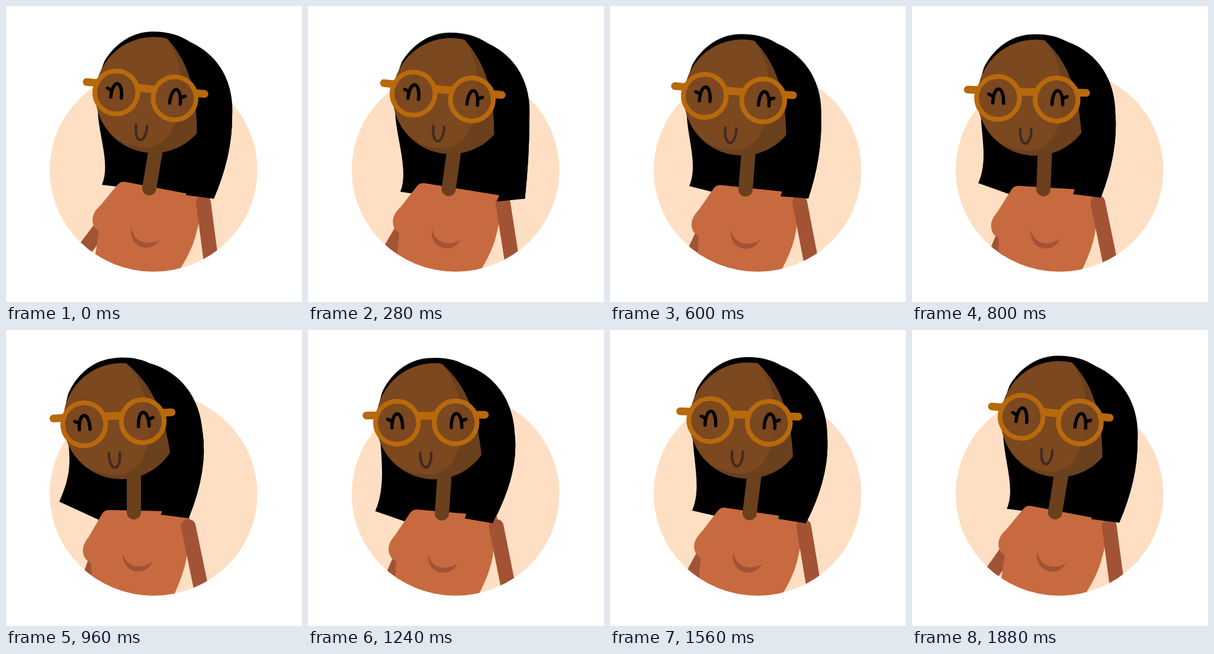
An HTML page for the animation above (1.92 s loop, 500 by 500 pixels).

```html
<!DOCTYPE html>
<html lang="en">
<head>
<meta charset="utf-8">
<title>Swaying portrait</title>
<style>
  html, body { margin: 0; width: 100%; height: 100%; overflow: hidden; background: #fff; }
  svg { display: block; width: 100%; height: 100%; }
  .line { fill: none; stroke-linecap: round; }
</style>
</head>
<body>
<svg viewBox="0 0 500 500">
  <clipPath id="disc"><ellipse cx="249.2" cy="277" rx="175.4" ry="171.7"/></clipPath>
  <ellipse cx="249.2" cy="277" rx="175.4" ry="171.7" fill="#fedfc3"/>
  <g clip-path="url(#disc)">
    <path id="leftArm" fill="none" stroke="#a25335" stroke-width="25"/>
  </g>
  <path id="hair"/>
  <g clip-path="url(#disc)">
    <!-- torso, origin at the base of the neck -->
    <g id="torso">
      <path fill="#c86a3f" d="M-42-4L94-1Q94 32 90 70C87 92 80 112 69 137L49 190H-70L-72 89Q-72 84-78 82C-86 76-88 64-84 54Q-82 49-76 41L-54 3Q-50-4-42-4Z"/>
      <path fill="#a25335" d="M-19 68C-20 87-9 100 8 100C19 100 28 92 32 82C24 89 14 92 4 91C-9 89-17 79-19 68Z"/>
    </g>
    <path id="rightArm" class="line" stroke="#a25335" stroke-width="25"/>
  </g>
  <path id="neck" class="line" stroke="#6b401d" stroke-width="24" d="M0 0V-72"/>
  <path id="strand"/>
  <!-- head, origin at the middle of the glasses -->
  <g id="head">
    <path fill="#6b401d" d="M93 55A98 98 0 1 1 26.6-99.2C57.5-72 85-30 93 55Z"/>
    <path fill="#7b481f" d="M26.6-99.2C50-72 59-40 59 0C62 46 42 88 5 88C-25 88-50 78-67.5 51.5A98 98 0 0 1 26.6-99.2Z"/>
    <g class="line" stroke="#b8690c">
      <path stroke-width="13" d="M-101-12.5H-84M99-12.5H84M-14-11.5H14"/>
      <g stroke-width="8" fill="#7b481f" fill-opacity=".75">
        <circle cx="-49.5" r="36.3"/>
        <circle cx="49.5" r="36.3"/>
      </g>
    </g>
    <path class="line" stroke="#000" stroke-width="5.6" transform="translate(1 -.8)" d="M-59 9.5C-59-22-41-22-41 9.5M-66-5L-58.5-1.5M41 9.5C41-22 59-22 59 9.5M66-4.5L58.5-1.5"/>
    <path class="line" stroke="#422a21" stroke-width="4.3" d="M-10.5 51C-11.5 84 9 84 8 51"/>
  </g>
</svg>
<script>
const LOOP = 1920, HALF = LOOP / 2, STEP = 40;

const el = id => document.getElementById(id);
const draw = (id, d) => el(id).setAttribute('d', d);
const place = (id, x, y, angle) =>
  el(id).setAttribute('transform', `translate(${x} ${y}) rotate(${angle})`);

// A single smooth swell between start and start + length.
function swell(t, start, length) {
  const u = (t - start) / length;
  return u > 0 && u < 1 ? Math.sin(Math.PI * u) ** 2 : 0;
}

function render(t) {
  // 0 is the pose on the right, 1 the pose on the left; each part has its own easing there and back.
  const travel = 1 - Math.abs(t / HALF - 1);
  const ease = (there, back) => travel ** (t < HALF ? there : back);

  const body = ease(1.45, 1.45);
  const arc = 8 * body * (1 - body);
  const neckX = 242 - 26 * body, neckY = 308 + arc;
  const lean = 9.5 * (1 - body);

  const shift = ease(1.55, 1.2);
  const headX = 235.5 - 54 * shift;
  const headY = 151 + 5.7 * (1 - (1 - shift) ** 2.5);
  const tilt = 5.8 - 8.8 * ease(4, 1.05);

  // The hair ends trail behind the head on both ways.
  const flick = swell(t, 0, 700), drag = swell(t, HALF, 800), snap = travel ** 8;
  const swing = ease(2, 1.15);
  const leftX = 162 - 72 * swing, leftY = 302 + 13 * flick + 6 * drag - 12 * snap;
  const rightX = 351 - 42.5 * shift + 24 * flick - 14 * drag;
  const rightY = 325.5 + 2 * drag - 7.5 * snap;
  const innerX = rightX - 47, innerY = rightY - 6 + 12 * flick - 3 * drag;

  const a = tilt * Math.PI / 180, cos = Math.cos(a), sin = Math.sin(a);
  const onHead = (x, y) => `${headX + x * cos - y * sin} ${headY + x * sin + y * cos} `;

  place('head', headX, headY, tilt);
  place('torso', neckX, neckY, lean);
  place('neck', neckX, neckY, lean);

  const hemX = neckX - 20;
  const hemY = leftY + (0.12 + 0.34 * swing) * (hemX - leftX);
  const rightEdge = `${onHead(149.5, 22)}Q${onHead(156, 88)}${rightX} ${rightY}`;

  draw('hair', `M${onHead(-78, 27)}`
    + `C${onHead(-82, 0)}${onHead(-82, -28)}${onHead(-74.5, -51)}`
    + `C${onHead(-60, -82)}${onHead(-32, -106)}${onHead(3, -108.7)}`
    + `C${onHead(28, -111)}${onHead(48, -107)}${onHead(66, -97.5)}`
    + `C${onHead(118, -80)}${onHead(148, -35)}${rightEdge}`
    + `L${hemX} ${hemY}L${leftX} ${leftY}`
    + `C${leftX + 16} ${leftY - 36} ${onHead(-75, 70)}${onHead(-78, 27)}Z`);
  draw('strand', `M${innerX} ${innerY}l17 -50L${rightEdge}Z`);

  const bend = ease(0.7, 0.7);
  const cuffX = 133 + 11 * bend + 2 * arc;
  const reach = 45 * (0.75 - 0.4 * bend);
  draw('leftArm', `M${cuffX + reach} 366L${cuffX - reach} 456`);

  const shoulderX = 333.5 - 25.5 * body;
  const elbowX = 345 - 18.7 * body + arc;
  draw('rightArm', `M${shoulderX} 332L${2 * elbowX - shoulderX} 508`);
}

function tick() {
  render(Math.floor(performance.now() % LOOP / STEP) * STEP);
  requestAnimationFrame(tick);
}
tick();
</script>
</body>
</html>
```
